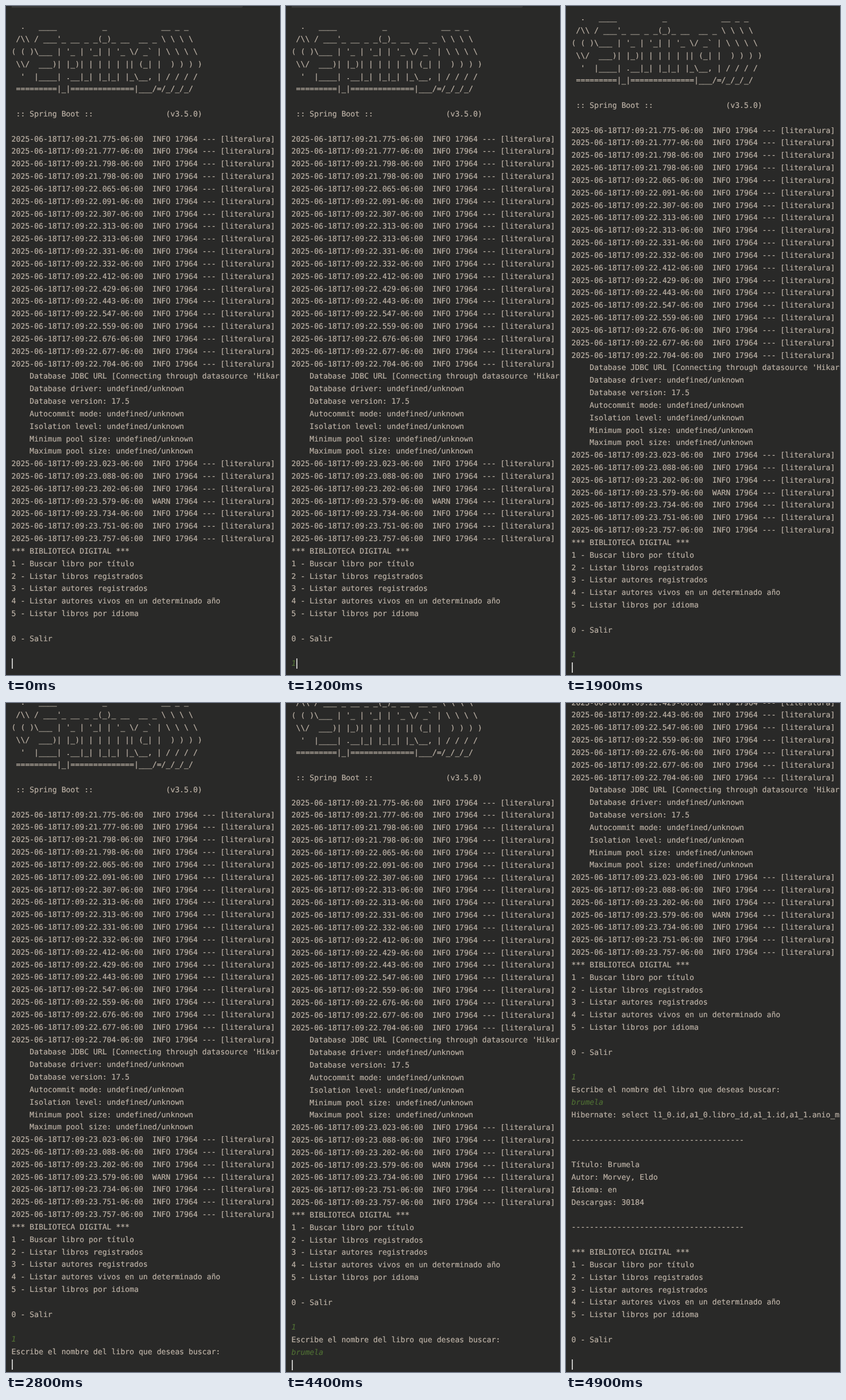
An HTML page that plays this animation: 479x1169 px, repeating every 5.4 s.

```html
<!DOCTYPE html>
<html lang="es">
<head>
<meta charset="utf-8">
<title>Biblioteca digital</title>
<style>
  html, body { margin: 0; width: 100%; height: 100%; overflow: hidden; background: #292928; }
  #screen { position: relative; width: 479px; height: 1169px; overflow: hidden; background: #292928; }
  #page { position: absolute; left: 0; top: 0; }
  #bar { position: absolute; left: 10px; top: -20px; width: 404px; height: 23px; border-radius: 0 0 3px 0; background: #3a3a39; }
  #log {
    position: absolute; left: 9.6px; top: 26.2px;
    font: 13.2px/21.84px "DejaVu Sans Mono", monospace;
    text-rendering: geometricPrecision; font-variant-ligatures: none;
    white-space: pre; color: #bdb2a6; -webkit-text-stroke: 0.2px;
  }
  #log div { height: 21.84px; }
  #log .typed { color: #4f6e34; font-style: italic; }
  #caret { position: absolute; width: 1.7px; height: 18px; background: #c4c4c2; }
  #banner { display: none; }
</style>
</head>
<body>
<pre id="banner">
  .   ____          _            __ _ _
 /\\ / ___'_ __ _ _(_)_ __  __ _ \ \ \ \
( ( )\___ | '_ | '_| | '_ \/ _` | \ \ \ \
 \\/  ___)| |_)| | | | | || (_| |  ) ) ) )
  '  |____| .__|_| |_|_| |_\__, | / / / /
 =========|_|==============|___/=/_/_/_/

 :: Spring Boot ::                (v3.5.0)
</pre>
<div id="screen">
  <div id="page">
    <div id="bar"></div>
    <div id="log"></div>
    <div id="caret"></div>
  </div>
</div>
<script>
const LOOP = 5400, LINE = 21.84, CHAR = 7.95, LEFT = 10, TOP = 26.2;
const $ = id => document.getElementById(id);

const entry = s => `2025-06-18T17:09:${s}-06:00  ${s === '23.579' ? 'WARN' : 'INFO'} 17964 --- [literalura]`;
const entries = list => list.split(' ').map(entry);
const unknown = ['Autocommit mode', 'Isolation level', 'Minimum pool size', 'Maximum pool size']
  .map(k => `    ${k}: undefined/unknown`);
const menu = [
  '*** BIBLIOTECA DIGITAL ***',
  '1 - Buscar libro por título',
  '2 - Listar libros registrados',
  '3 - Listar autores registrados',
  '4 - Listar autores vivos en un determinado año',
  '5 - Listar libros por idioma',
  '', '0 - Salir', ''
];
const rule = '-'.repeat(38);

const lines = [
  ...$('banner').textContent.replace(/\n$/, '').split('\n'),
  '',
  ...entries('21.775 21.777 21.798 21.798 22.065 22.091 22.307 22.313 22.313 22.331 22.332 22.412 22.429 22.443 22.547 22.559 22.676 22.677 22.704'),
  "    Database JDBC URL [Connecting through datasource 'Hikar",
  '    Database driver: undefined/unknown',
  '    Database version: 17.5',
  ...unknown,
  ...entries('23.023 23.088 23.202 23.579 23.734 23.751 23.757'),
  ...menu,
  '1',
  'Escribe el nombre del libro que deseas buscar:',
  'brumela',
  'Hibernate: select l1_0.id,a1_0.libro_id,a1_1.id,a1_1.anio_m',
  '', rule, '',
  'Título: Brumela',
  'Autor: Morvey, Eldo',
  'Idioma: en',
  'Descargas: 30184',
  '', rule, '',
  ...menu,
  ''
];
const CHOICE = 51, TITLE = 53, END = lines.length - 1;

// time, caret row, caret column, caret visible
const steps = [
  [0, CHOICE, 0, true],
  [400, CHOICE, 0, false],
  [1200, CHOICE, 1, true],
  [1800, CHOICE + 1, 0, true],
  [2000, TITLE, 0, true],
  [3000, TITLE, 1, true],
  [3200, TITLE, 2, true],
  [3400, TITLE, 3, true],
  [3600, TITLE, 4, true],
  [3700, TITLE, 5, true],
  [3800, TITLE, 6, true],
  [3900, TITLE, 7, true],
  [4400, TITLE + 1, 0, true],
  [4700, END, 0, true]
];

const rows = lines.map((text, i) => {
  const div = document.createElement('div');
  if (i === CHOICE || i === TITLE) div.className = 'typed';
  $('log').append(div);
  return div;
});

// Everything before the caret is on screen; the view follows the caret row.
function show([, row, col, on]) {
  rows.forEach((div, i) => {
    div.textContent = i < row ? lines[i] : i === row ? lines[i].slice(0, col) : '';
  });
  const scroll = row > CHOICE ? Math.round((row - CHOICE - 1) * LINE + 14.7) : 0;
  $('page').style.top = -scroll + 'px';
  const caret = $('caret').style;
  caret.left = LEFT + col * CHAR + 'px';
  caret.top = TOP + row * LINE + 'px';
  caret.visibility = on ? 'visible' : 'hidden';
}

const start = performance.now();
let current = null;
function tick() {
  const t = (performance.now() - start) % LOOP;
  const step = steps.findLast(s => s[0] <= t);
  if (step !== current) show(current = step);
  requestAnimationFrame(tick);
}
tick();
</script>
</body>
</html>
```
